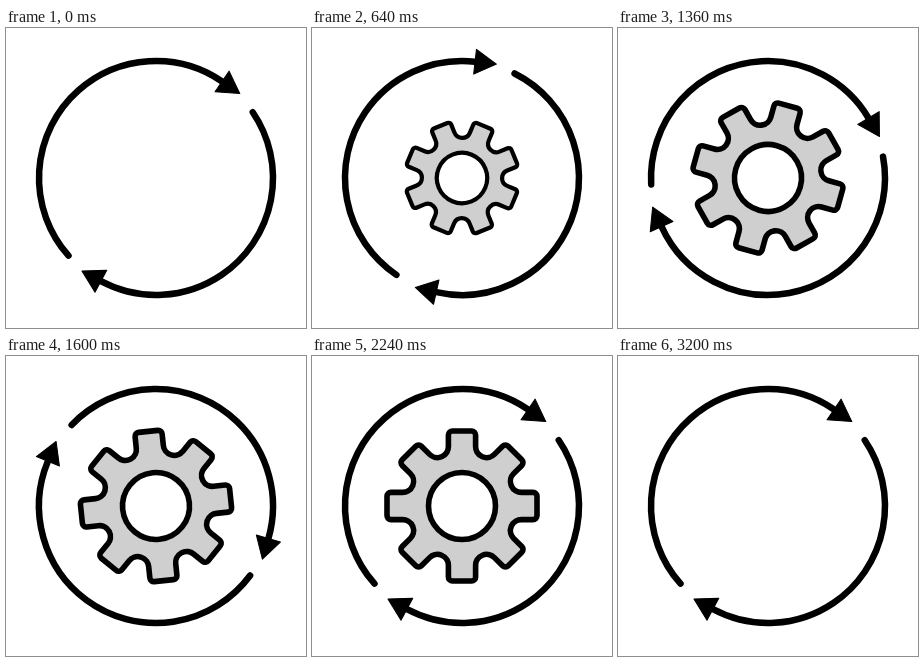
Write an HTML page with a canvas that moves like this. It is 300 px wide and 300 px high and loops after 3360 ms.

```html
<!DOCTYPE html>
<html lang="en">
<head>
<meta charset="utf-8">
<title>Gear cycle</title>
<style>
  html, body { margin: 0; width: 100%; height: 100%; overflow: hidden; background: #fff; }
  canvas { display: block; width: 300px; height: 300px; }
</style>
</head>
<body>
<canvas id="stage"></canvas>
<script>
const LOOP = 3360, STEP = 40, PHASE = 1120, SHRINK = 1040;
const SIZE = 300, RING = 117;
const INK = '#000', STEEL = '#cfcfcf';

const canvas = document.getElementById('stage');
const ctx = canvas.getContext('2d');
const dpr = window.devicePixelRatio || 1;
canvas.width = canvas.height = SIZE * dpr;

const rad = deg => deg * Math.PI / 180;
const clamp = v => Math.min(1, Math.max(0, v));

// Bezier easing whose handles are level at both ends
function ease(x1, x2) {
  return t => {
    t = clamp(t);
    let lo = 0, hi = 1;
    for (let i = 0; i < 30; i++) {
      const s = (lo + hi) / 2, q = 1 - s;
      if (3 * q * q * s * x1 + 3 * q * s * s * x2 + s ** 3 < t) lo = s; else hi = s;
    }
    return lo * lo * (3 - 2 * lo);
  };
}

const ringIn = ease(0.1, 0.2);
const gearIn = ease(0.15, 0.52);
const turn = ease(0.18, 0.77);
const circOut = t => Math.sqrt(1 - (1 - clamp(t)) ** 2);

function rotated([x, y], deg) {
  const c = Math.cos(rad(deg)), s = Math.sin(rad(deg));
  return [x * c - y * s, x * s + y * c];
}

// Eight straight-sided teeth joined by round valleys
function gearPath() {
  const half = 13.6, tip = 75, valley = half / Math.sin(rad(22.5));
  const tooth = [
    [[half, -tip], 4],
    [rotated([0, -valley], 22.5), 11],
    [rotated([-half, -tip], 45), 4]
  ];
  const path = [];
  for (let i = 0; i < 8; i++) {
    for (const [p, r] of tooth) path.push([rotated(p, i * 45), r]);
  }
  ctx.beginPath();
  ctx.moveTo(0, -tip);
  path.forEach(([p, r], i) => {
    const next = path[(i + 1) % path.length][0];
    ctx.arcTo(...p, ...next, r);
  });
  ctx.closePath();
}

function drawGear(scale, angle) {
  if (scale < 0.003) return;
  ctx.save();
  ctx.rotate(rad(angle));
  ctx.scale(scale, scale);
  ctx.lineWidth = 5.6;
  ctx.lineJoin = 'round';
  gearPath();
  ctx.fillStyle = STEEL;
  ctx.fill();
  ctx.stroke();
  ctx.beginPath();
  ctx.arc(0, 0, 33.5, 0, Math.PI * 2);
  ctx.fillStyle = '#fff';
  ctx.fill();
  ctx.stroke();
  ctx.restore();
}

function drawArrow(tail, base) {
  ctx.lineWidth = 6.5;
  ctx.lineCap = 'round';
  ctx.beginPath();
  ctx.arc(0, 0, RING, rad(tail), rad(base));
  ctx.stroke();

  ctx.save();
  ctx.rotate(rad(base));
  ctx.beginPath();
  ctx.moveTo(RING - 12.5, 0);
  ctx.lineTo(RING + 12.5, 0);
  ctx.lineTo(RING, 21.5);
  ctx.closePath();
  ctx.fillStyle = INK;
  ctx.fill();
  ctx.lineWidth = 1;
  ctx.lineJoin = 'round';
  ctx.stroke();
  ctx.restore();
}

function draw(time) {
  const second = turn((time - PHASE) / PHASE);
  const grown = gearIn(time / PHASE);
  const ring = 180 * (ringIn(time / PHASE) + second);
  const scale = grown * (1 - circOut((time - 2 * PHASE) / SHRINK));

  ctx.setTransform(dpr, 0, 0, dpr, 0, 0);
  ctx.fillStyle = '#fff';
  ctx.fillRect(0, 0, SIZE, SIZE);
  ctx.translate(SIZE / 2, SIZE / 2);
  ctx.strokeStyle = INK;

  drawGear(scale, 90 * (grown + second));
  ctx.rotate(rad(ring));
  drawArrow(138.4, 304.4);
  drawArrow(-34.2, 118.1);
}

const start = performance.now();
function tick() {
  const time = (performance.now() - start) % LOOP;
  draw(Math.floor(time / STEP) * STEP);
  requestAnimationFrame(tick);
}
tick();
</script>
</body>
</html>
```
